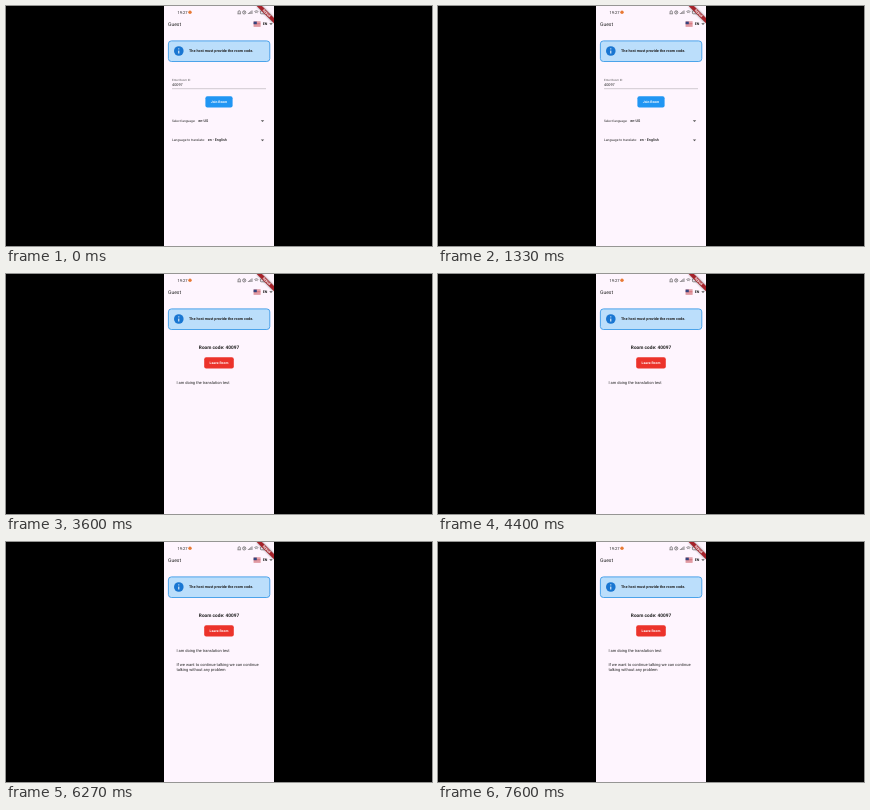
An HTML page that plays this animation: 426x240 px, repeating every 7670 ms.

```html
<!DOCTYPE html>
<html lang="en">
<head>
<meta charset="utf-8">
<title>Guest room</title>
<style>
  html, body { margin: 0; width: 100%; height: 100%; overflow: hidden; background: #000; }
  svg { display: block; width: 100vw; height: 100vh; }
  text { font-family: Roboto, sans-serif; font-size: 4px; fill: #222; text-rendering: geometricPrecision; }
  .bold { font-weight: 700; }
  .mid { text-anchor: middle; }
  .white { fill: #fff; }
  .icon { fill: none; stroke: #444; stroke-width: .6; }
  .value { font-size: 3.7px; font-weight: 500; }
</style>
</head>
<body>
<svg viewBox="0 0 426 240">
  <defs>
    <clipPath id="phone"><path d="M158 0h110v240h-110z"/></clipPath>
    <path id="arrow" d="M-1.7-.8h3.4L0 1z"/>
    <path id="ribbon" d="M250.7 0h5.2L268 12.1v5.2z"/>
    <filter id="soft"><feGaussianBlur stdDeviation=".9"/></filter>
  </defs>
  <rect width="426" height="240"/>
  <g clip-path="url(#phone)">
    <rect x="158" width="110" height="240" fill="#fef5fe"/>

    <!-- status bar -->
    <text x="171.5" y="7.7">19:27</text>
    <circle cx="184" cy="6.3" r="1.7" fill="#e87a35"/>
    <g class="icon">
      <path d="M231.5 7.8h3.4M232.1 7.6V5.8a1.1 1.1 0 0 1 2.2 0v1.8"/>
      <circle cx="238.2" cy="6.4" r="1.6"/>
      <path d="M238.2 5.4v1l.7.4M242.4 8V7M243.6 8V6.2M244.8 8V5.2M246 8V4.4M248.4 5.5q2-1.5 4 0M249.2 6.7q1.2-.9 2.4 0"/>
      <rect x="254.4" y="4.8" width="5" height="3" rx=".8"/>
    </g>

    <!-- app bar -->
    <text x="162" y="19.8" style="font-size:5px">Guest</text>
    <path d="M247.6 15.6h7v4.8h-7z" fill="#f3dfe3"/>
    <path d="M247.6 16h7M247.6 17.4h7M247.6 18.8h7M247.6 20.1h7" stroke="#c8404c" stroke-width=".7"/>
    <path d="M247.6 15.6h3.2v2.6h-3.2z" fill="#34437e"/>
    <text class="bold" x="256.8" y="19.3" style="font-size:3.6px">EN</text>
    <use href="#arrow" x="265" y="18" fill="#555"/>

    <!-- corner ribbon with its shadow -->
    <use href="#ribbon" opacity=".5" filter="url(#soft)"/>
    <use href="#ribbon" fill="#a5222a"/>
    <text class="mid white" transform="translate(259.9 8.1) rotate(45)" style="font-size:3.1px;font-weight:900">DEBUG</text>

    <!-- notice -->
    <rect x="162.4" y="34.9" width="101.4" height="20.6" rx="3" fill="#bbdefb" stroke="#3b9be8" stroke-width=".9"/>
    <circle cx="172.8" cy="45" r="4.8" fill="#1976d2"/>
    <path d="M172.8 44.6v2.9M172.8 42.4v1" stroke="#fff" stroke-width="1"/>
    <text class="bold" x="183" y="46.4" style="font-size:3.78px">The host must provide the room code.</text>

    <g id="form">
      <text x="166" y="74.5" style="font-size:2.9px;fill:#555">Enter Room ID</text>
      <text x="166" y="80.2" style="font-size:3.8px">40097</text>
      <path d="M166 82.7h94" stroke="#777" stroke-width=".35"/>
      <rect x="199.4" y="90.2" width="27.2" height="11.4" rx="2" fill="#2196f3"/>
      <text class="bold mid white" x="213" y="97.1" style="font-size:3.4px">Join Room</text>
      <text x="166" y="116.2" style="font-size:3.2px">Select language:</text>
      <text class="value" x="192.3" y="116.3">en-US</text>
      <use href="#arrow" x="256.5" y="115" fill="#555"/>
      <text x="166" y="135.3" style="font-size:3.3px">Language to translate:</text>
      <text class="value" x="201.7" y="135.3">en - English</text>
      <use href="#arrow" x="256.5" y="134.2" fill="#555"/>
    </g>

    <g id="room">
      <text class="bold mid" x="213" y="74.7" style="font-size:4.75px">Room code: 40097</text>
      <rect x="198.2" y="83.2" width="29.6" height="11.4" rx="2" fill="#ec332b"/>
      <text class="bold mid white" x="213" y="90.1" style="font-size:3.4px">Leave Room</text>
      <text id="first" x="170.4" y="110.3">I am doing the translation test</text>
      <g id="second">
        <text x="170.4" y="123.6">If we want to continue talking we can continue</text>
        <text x="170.4" y="129">talking without any problem</text>
      </g>
    </g>

    <g id="snack">
      <rect x="158" y="227.6" width="110" height="13" fill="#4caf50"/>
      <text x="165" y="235" style="font-size:3.2px;fill:#d9f0da">Connection established with room: 40097</text>
    </g>
  </g>
</svg>
<script>
  const LOOP = 7670, STEP = 66.7;
  const JOIN = 2000, HIDE = 3200, FIRST = 3400, SECOND = 5800, SLIDE = 200;
  const get = id => document.getElementById(id);
  const show = (id, on) => { get(id).style.display = on ? '' : 'none'; };
  const ease = x => 1 - (1 - Math.min(1, Math.max(0, x))) ** 3;

  function draw(now) {
    const t = Math.floor((now % LOOP) / STEP + .01) * STEP;
    show('form', t < JOIN);
    show('room', t >= JOIN);
    show('first', t >= FIRST);
    show('second', t >= SECOND);
    const rise = ease((t - JOIN) / SLIDE) - ease((t - HIDE) / SLIDE);
    show('snack', rise > 0);
    get('snack').setAttribute('transform', `translate(0 ${13 * (1 - rise)})`);
    requestAnimationFrame(draw);
  }
  draw(0);
</script>
</body>
</html>
```
